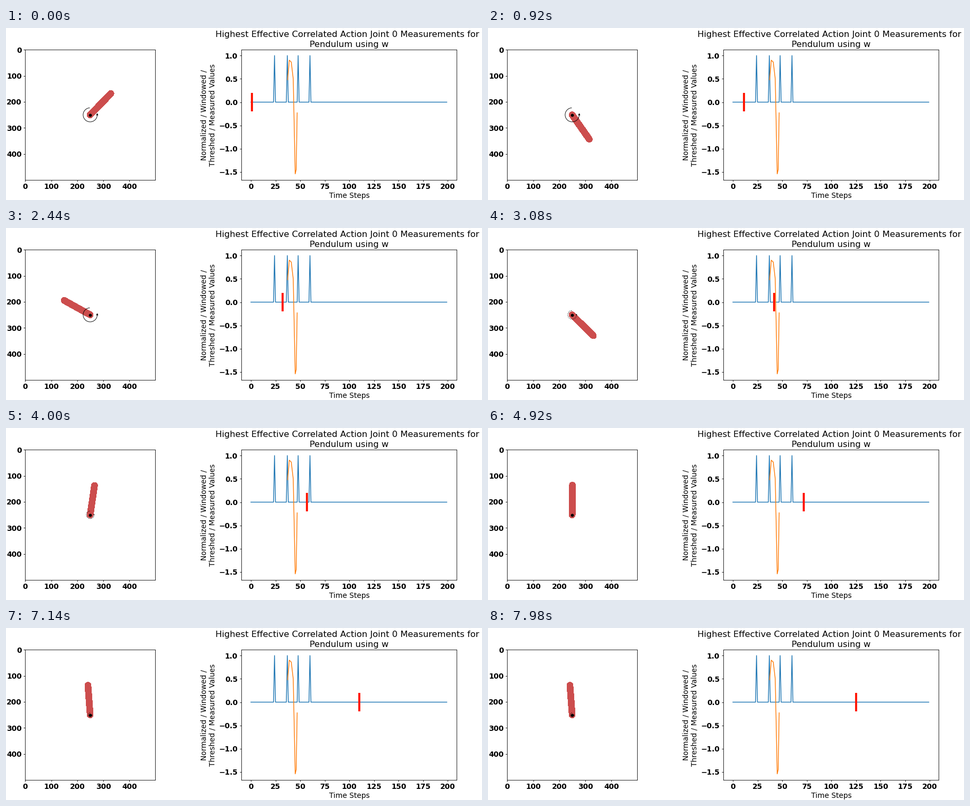
A matplotlib script that plays this animation: 900x326 px, repeating every 8000 ms.

```python
import numpy as np
import matplotlib.pyplot as plt
from matplotlib.animation import FuncAnimation

W, H, DPI = 900, 326, 100
FRAMES, INTERVAL = 400, 20
LAST_STEP = 125
PT = 72 / DPI  # points per pixel

plt.rcParams.update({
    "font.family": "DejaVu Sans",
    "axes.linewidth": 0.85 * PT,
    "xtick.major.width": 0.85 * PT,
    "ytick.major.width": 0.85 * PT,
    "xtick.major.size": 3.2 * PT,
    "ytick.major.size": 3.2 * PT,
    "xtick.major.pad": 3.2 * PT,
    "ytick.major.pad": 3.2 * PT,
})

LABEL, TITLE = 13.75 * PT, 16.4 * PT
PIVOT = np.array([249.5, 250.0])
ROD = 114            # rod length in image units
RING = 27            # torque arrow radius at full torque
RATE = np.sqrt(15) * 0.05  # pendulum's natural rate per time step


def step_at(frame):
    """Playback speeds up slightly on its way to the last step."""
    progress = (frame / (FRAMES - 1)) ** 1.162
    return int(1 + (LAST_STEP - 1) * progress + 0.5)


def smooth(u):
    u = np.clip(u, 0, 1)
    return u * u * (3 - 2 * u)


def swing_angle(step):
    """Degrees from hanging: one swing left, one up to the top, a slight lean."""
    left = 0.947 * np.tanh(RATE * (step - 12.7))
    up = 0.9735 * (1 + np.tanh(RATE * (step - 40)))
    lean = 4.3 * smooth((step - 72) / 20)
    return 2 * np.degrees(np.arcsin(np.clip(up - left, -1, 1))) + lean


def torque_at(step, angle):
    """Full push while swinging up, then in proportion to the tilt."""
    return 1 if step < 40 else min(0.62, 0.065 * abs(180 - angle))


fig = plt.figure(figsize=(W / DPI, H / DPI), dpi=DPI, facecolor="white")


def make_axes(x0, y0, x1, y1, **limits):
    ax = fig.add_axes([x0 / W, 1 - y1 / H, (x1 - x0) / W, (y1 - y0) / H])
    ax.set(**limits)
    ax.tick_params(labelsize=LABEL)
    for label in ax.get_xticklabels() + ax.get_yticklabels():
        label.set_fontweight("bold")
    return ax


def put_text(x, y, text, size, angle=0):
    fig.text(x / W, 1 - y / H, text, size=size, rotation=angle,
             rotation_mode="anchor", ha="center", va="baseline")


# Pendulum view
view = make_axes(36, 41, 282.3, 287.7,
                 xlim=(-0.5, 499.5), ylim=(499.5, -0.5),
                 xticks=range(0, 500, 100), yticks=range(0, 500, 100))
rod, = view.plot([], [], color=(0.8, 0.3, 0.3), lw=11.7 * PT,
                 solid_capstyle="round", antialiased=False, zorder=2)
ring, = view.plot([], [], color="black", lw=0.9 * PT, zorder=3)
head, = view.fill([0, 0, 0], [0, 0, 0], color="black", lw=0, zorder=3)
view.plot(*PIVOT, "o", color="black", ms=5.8 * PT, mew=0, zorder=4)

# Measurement chart
chart = make_axes(444.5, 41, 852, 287.7,
                  xlim=(-9.95, 208.95), ylim=(-1.667, 1.127),
                  xticks=range(0, 201, 25), yticks=np.arange(-1.5, 1.1, 0.5))
pulses = np.zeros(200)
pulses[[24, 37, 48, 60]] = 1
chart.plot(pulses, color="tab:blue", lw=1.45 * PT)
chart.plot([37.3, 39, 41, 43, 45, 46, 47],
           [0.48, 0.9, 0.86, 0.5, -1.54, -1.45, -0.23],
           color="tab:orange", lw=1.45 * PT)
marker, = chart.plot([], [], color="#ff1a08", lw=4 * PT,
                     solid_capstyle="butt", zorder=5)

put_text(645.2, 16.8, "Highest Effective Correlated Action Joint 0 "
         "Measurements for", TITLE)
put_text(648.2, 35.8, "Pendulum using w", TITLE)
put_text(649, 322, "Time Steps", LABEL)
put_text(379, 164.6, "Normalized / Windowed /", LABEL, 90)
put_text(394.5, 164.6, "Threshed / Measured Values", LABEL, 90)

ARC = np.radians(np.linspace(95, 357, 60))
ARC_XY = np.column_stack([np.cos(ARC), -np.sin(ARC)])
HEAD_XY = np.array([(0.84, 0.06), (1.16, 0.06), (1.0, -0.24)])


def draw(frame):
    step = step_at(frame)
    angle = swing_angle(step)
    rad = np.radians(angle)
    tip = PIVOT + ROD * np.array([np.sin(rad), np.cos(rad)])
    rod.set_data([PIVOT[0], tip[0]], [PIVOT[1], tip[1]])

    torque = torque_at(step, angle)
    ring.set_data(*(PIVOT + RING * torque * ARC_XY).T)
    ring.set_linestyle("-" if torque == 1 else (0, (1.6, 1.8)))
    head.set_xy(PIVOT + RING * torque * HEAD_XY)

    marker.set_data([step, step], [-0.2, 0.2])
    return rod, ring, head, marker


anim = FuncAnimation(fig, draw, frames=FRAMES, interval=INTERVAL,
                     repeat=True, repeat_delay=0, blit=False)
plt.show()
```
